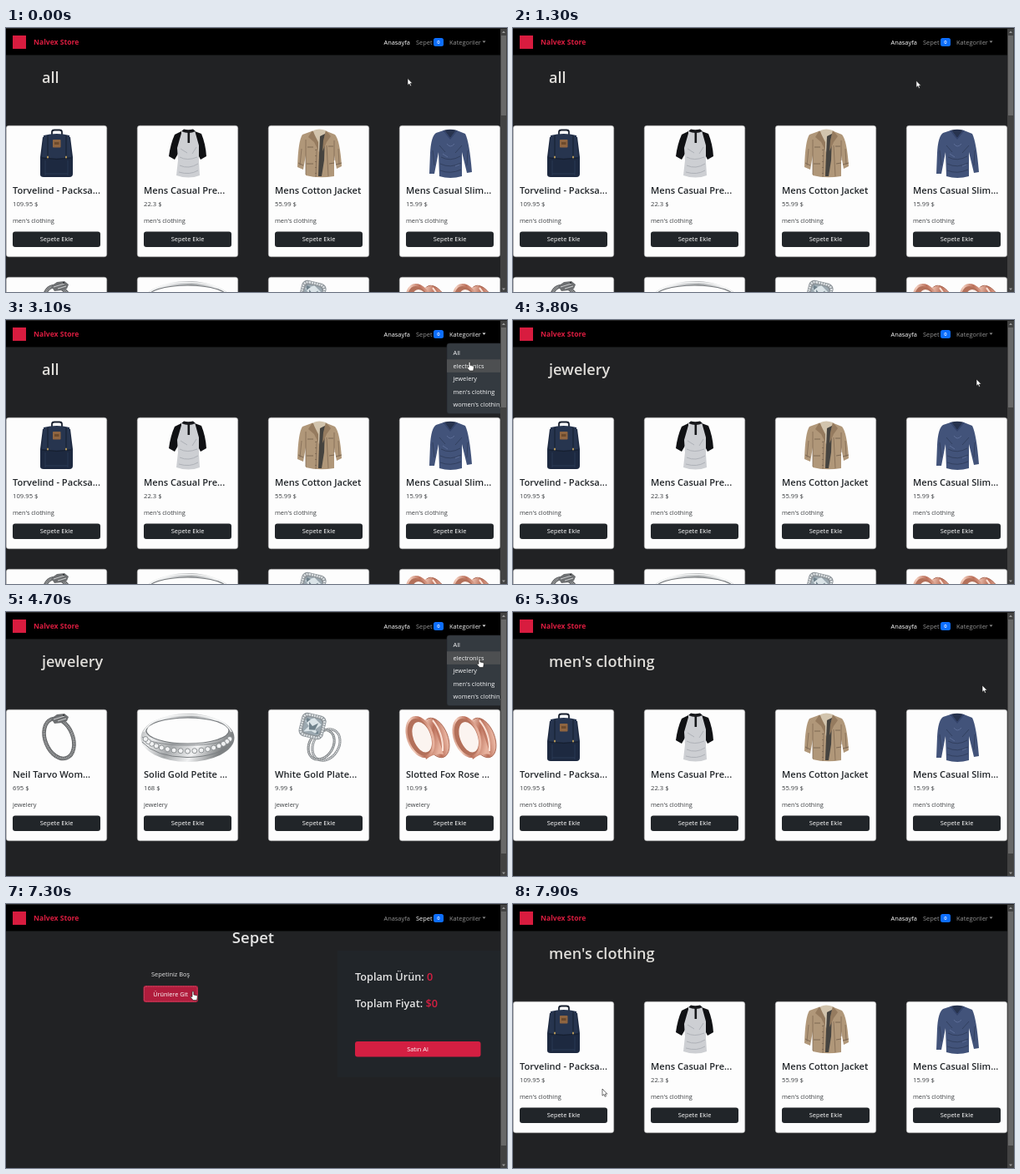
Animation of 600 by 317 pixels, one loop 8 s. Source, as an HTML page:

```html
<!DOCTYPE html>
<html lang="tr">
<head>
<meta charset="utf-8">
<title>Store</title>
<style>
html, body { margin: 0; width: 100%; height: 100%; overflow: hidden; background: #212224; }
svg { display: block; width: 100vw; height: 100vh; }
text { font-family: "Open Sans", "Noto Sans", sans-serif; }
.bold { font-weight: 600; }
.mid { text-anchor: middle; }
</style>
</head>
<body>
<svg id="stage" viewBox="0 0 600 317" xmlns="http://www.w3.org/2000/svg"></svg>
<script>
const RED = '#d41f42', MUTED = '#949494', LIGHT = '#e4e4e4';
const LOOP = 8000, STEP = 100;

const rect = (x, y, w, h, fill, r = 0, extra = '') =>
  `<rect x="${x}" y="${y}" width="${w}" height="${h}" rx="${r}" fill="${fill}" ${extra}/>`;
const text = (x, y, str, fill, size = 7.4, cls = '', extra = '') =>
  `<text x="${x}" y="${y}" fill="${fill}" class="${cls}" font-size="${size}" ${extra}>${str}</text>`;
const path = (d, fill, extra = '') => `<path d="${d}" fill="${fill}" ${extra}/>`;
const line = (d, color, width, extra = '') =>
  `<path d="${d}" fill="none" stroke="${color}" stroke-width="${width}" ${extra}/>`;
const ellipse = (cx, cy, rx, ry, fill, extra = '') =>
  `<ellipse cx="${cx}" cy="${cy}" rx="${rx}" ry="${ry}" fill="${fill}" ${extra}/>`;
const hoop = (cx, cy, rx, ry, color, width, extra = '') =>
  ellipse(cx, cy, rx, ry, 'none', `stroke="${color}" stroke-width="${width}" ${extra}`);
const place = (transform, body) => `<g transform="${transform}">${body}</g>`;
const group = (id, body, extra = '') => `<g id="${id}" ${extra}>${body}</g>`;
const gradient = (id, ...colors) => `<linearGradient id="${id}" x2="1" y2=".35">` +
  colors.map((c, i) => `<stop offset="${i / (colors.length - 1)}" stop-color="${c}"/>`).join('') +
  '</linearGradient>';

// Product pictures, drawn relative to a card's top left corner.
const backpack =
  line('M55 12V8Q55 5.5 58 5.5H64Q67 5.5 67 8V12', '#18202f', 1.8) +
  path('M44 14L41 38V59Q41 62 45 62H76Q80 62 80 58V38L77 14Z', '#1d2940') +
  path('M45 12Q61 8 76 12L78 38Q61 41 43 38Z', '#27354f') +
  line('M50 12V40M72 12V40M43 39Q61 42 78 39', '#151e2e', 1) +
  line('M47 42V60M74 42V60M47 58H74', '#30405d', .7) +
  rect(56, 17, 9.5, 9.5, '#8f6541', .8) + rect(58, 20, 5.5, 3, '#6c4a2c') +
  ellipse(50, 38, 1, 1.5, '#c0a05e') + ellipse(72, 38, 1, 1.5, '#c0a05e');

const raglan =
  path('M53 7L45 11Q40 22 38 37L45 41L53 27ZM69 7L77 10Q82 22 83 37L76 41L69 27Z', '#101114') +
  path('M54 6Q62 10 69 6L74 24L74 44L75 60Q62 65 47 60L49 42L48 27Z', '#cdcfd3') +
  path('M53 7Q62 11 70 7L67 4.5Q61 6 56 4.5Z', '#17181b') +
  rect(60.5, 8, 2.6, 13, '#17181b', .5) +
  line('M52 28L60 33M51 38Q60 43 72 38M51 48Q62 53 73 46M50 56Q63 60 73 54M71 26L66 34', '#aeb1b7', 1);

const jacket =
  path('M52 7L41 11Q36 18 35 50L42 53L45 36V60Q60 64 79 61L79 36L82 52L88 49Q86 18 80 11L70 7Z', '#b09779') +
  path('M54 6Q61 3 69 6L66 28L63 39L58 22Z', '#d2c4ad') +
  path('M62 13L68 10L67 42L64 61H60L61 35Z', '#45433f') +
  path('M53 6L48 14L55 20L60 30V20ZM69 6L75 13L70 20L65 31L66 18Z', '#957b5f') +
  line('M45 17V59M58 28L57 62M70 24L72 61M79 18V42M40 28L38 48M84 28L85 47', '#806a53', .8) +
  line('M46 46H54M73 46L79 45M47 26H54M72 25H78M36 45L42 48M81 47L88 45', '#7d6853', 1) +
  line('M57 29V58', '#5d4b3b', .9, 'stroke-dasharray="1 6"');

const sweater =
  path('M53 6L44 9Q38 13 37 33L36 58L42 58L47 32L48 61Q61 65 75 61L75 32L81 57L87 56Q84 20 79 10L69 6Z', '#42537a') +
  path('M54 5.5Q61 4 68 5.5L61 15Z', '#27334e') +
  line('M53 6L61 16L69 6', '#33436a', 1.3) +
  line('M48 24L55 32M75 24L67 33M50 38Q61 44 73 37M49 46Q61 52 74 45M49 54Q61 59 74 53M40 30L42 48M82 30L81 48', '#32405f', 1) +
  line('M57 22Q61 28 66 22M52 34L58 38M67 49L72 47', '#5d6e98', 1);

const bracelet =
  place('translate(63.5 35) rotate(-22)',
    hoop(0, 0, 16.5, 25, '#606264', 4.6) +
    hoop(0, 0, 16.5, 25, '#a9abac', 2.8, 'stroke-dasharray="1 .9"')) +
  path('M54 11L61 6L70 5L75 9L73 14L67 16L58 17Z', '#6d6f71') +
  line('M57 12L70 8M62 14L72 11', '#cfd0d1', 1) + ellipse(69, 7, 1, 1, '#2c2e30');

const gems = Array.from({ length: 17 }, (_, i) => {
  const a = (18 + i * 9) * Math.PI / 180;
  return ellipse((60.5 + 53 * Math.cos(a)).toFixed(1), (29 + 21 * Math.sin(a)).toFixed(1),
    3, 3, '#f0f1f2', 'stroke="#84888b" stroke-width=".9"');
}).join('');
const band =
  ellipse(60.5, 34, 56, 29, 'url(#silver)') +
  line('M6 39Q22 57 60 57.5Q99 57 115 39', '#7b7f82', 1) +
  line('M6 33Q18 42.5 60 43Q103 42.5 115 33', '#85898c', 1) + gems +
  ellipse(60.5, 25.5, 49.5, 15.5, '#fdfdfd', 'stroke="#75797c" stroke-width="1.2"') +
  line('M8 27Q18 7 60 6.5Q103 7 113 27', '#f4f5f5', 1.4);

const solitaire =
  place('translate(65 42) rotate(32)',
    hoop(4, -2, 15, 20, '#8b8f92', 3) + hoop(4, -2, 15, 20, '#e4e6e8', 1.3, 'stroke-dasharray="1.4 .7"') +
    hoop(-1, 1, 14, 19, '#7c8083', 3) + hoop(-1, 1, 14, 19, '#d3d6d8', 1.3, 'stroke-dasharray="1.4 .7"')) +
  place('translate(53 20) rotate(14)',
    rect(-15, -14.5, 30, 29, '#8a9196', 7) +
    rect(-13, -12.5, 26, 25, 'none', 6, 'stroke="#dde1e3" stroke-width="2.6" stroke-dasharray="2 .9"') +
    rect(-10.5, -10, 21, 20, '#9ba8b0', 5) +
    path('M-10 -4L0 -10L10 -4L4 3L10 9L0 6L-9 9L-4 1Z', '#dbe4e8') +
    path('M-5 -4L0 0L6 -5L4 4L-3 5ZM-9 -8L-4 -7L-8 -2ZM8 4L9 8L5 8Z', '#6f818b'));

const tunnel = x => place(`translate(${x} 0)`,
  place('rotate(-22 41 34)', ellipse(41, 34, 14, 25, 'url(#copper)') + hoop(41, 34, 14, 25, '#a45f49', .8)) +
  path('M14 10Q27 16 36 10L50 54Q38 52 29 60Z', 'url(#copper)') +
  place('rotate(-20 22 33)',
    ellipse(22, 33, 16, 26, 'url(#copper)') +
    ellipse(21.5, 33, 13.5, 23, '#b3705a') +
    ellipse(24, 34, 10.5, 19, '#fbf4f0')) +
  line('M37 13Q50 29 49 50', '#f9e0d5', 2));
const tunnels = tunnel(3) + tunnel(59);

const clothes = [
  ['Torvelind - Packsa...', '109.95 $', backpack],
  ['Mens Casual Pre...', '22.3 $', raglan],
  ['Mens Cotton Jacket', '55.99 $', jacket],
  ['Mens Casual Slim...', '15.99 $', sweater],
];
const jewels = [
  ['Neil Tarvo Wom...', '695 $', bracelet],
  ['Solid Gold Petite ...', '168 $', band],
  ['White Gold Plate...', '9.99 $', solitaire],
  ['Slotted Fox Rose ...', '10.99 $', tunnels],
];
const card = category => ([name, price, picture], i) => place(`translate(${i * 157} 117)`,
  rect(.25, .25, 120.5, 157.5, '#fdfdfd', 3, 'stroke="#a0a0a0" stroke-width=".5"') + picture +
  text(8, 82.3, name, '#212529', 11.1, 'bold') +
  text(8, 97, price, '#3c3f42', 7.7) +
  text(8, 116.5, category, '#3c3f42') +
  rect(8, 127.5, 105, 18.5, '#212529', 3) +
  text(60.5, 139.4, 'Sepete Ekle', '#fff', 7.4, 'mid'));

const MENU = ['All', 'electronics', 'jewelery', "men's clothing", "women's clothing"];
const MENU_TOP = 31.7, ROW = 15.6;

const listPage = group('list',
  text(43, 66.2, '', '#dfddd9', 18.1, 'bold', 'id="heading"') +
  group('clothes', clothes.map(card("men's clothing")).join('')) +
  group('jewels', jewels.map(card('jewelery')).join('')));

const total = (y, label, value) =>
  text(418, y, `${label}: <tspan fill="${RED}">${value}</tspan>`, LIGHT, 12.7, 'bold');
const cartPage = group('cart',
  text(296, 47, 'Sepet', LIGHT, 18.5, 'bold mid') +
  text(197, 87, 'Sepetiniz Boş', LIGHT, 7.4, 'mid') +
  rect(164.5, 98, 65.5, 20, RED, 3, 'id="goButton"') +
  rect(165.5, 99, 63.5, 18, 'none', 2.4, 'id="goRing" stroke="#e58a9b" stroke-width=".6" stroke-dasharray="1 1"') +
  text(197, 110.5, 'Ürünlere Git', '#fff', 7.3, 'mid') +
  rect(397, 56, 195, 152, '#212529') +
  total(92, 'Toplam Ürün', '0') + total(124, 'Toplam Fiyat', '$0') +
  rect(418, 165, 150.5, 18.5, RED, 3) +
  text(493, 177, 'Satın Al', '#fff', 7.4, 'mid'));

const navbar =
  rect(0, 0, 600, 32.5, '#000') + rect(0, 0, 600, 1, '#242424') +
  rect(8, 9, 16, 16, '#d81c3f') +
  text(33, 20, 'Nalvex Store', '#d81c3f', 8.6, '', 'font-weight="700"') +
  text(452.5, 19.5, 'Anasayfa', '#fff', 7.4, '', 'id="navHome"') +
  text(491, 19.5, 'Sepet', MUTED, 7.4, '', 'id="navCart"') +
  rect(512, 12, 12, 10, '#0d6efd', 2.5) + text(518, 19, '0', '#fff', 5.8, 'bold mid') +
  group('navMenu', text(531, 19.5, 'Kategoriler', 'inherit') + path('M570.5 15.5h4l-2 2.2z', 'inherit'));

const menu = group('menu',
  rect(528, 28, 70, 84.5, '#343a40', 3, 'stroke="#24282c" stroke-width=".6"') +
  rect(528, 0, 70, ROW, '#4d4f51', 0, 'id="menuHover"') +
  MENU.map((label, i) => text(535.5, 42.4 + i * (ROW - .1), label, '#f4f5f6')).join(''));

const scrollbar =
  rect(592, 1, 8, 316, '#424242') + rect(593, 9, 6, 96, '#686868', 0, 'id="thumb"') +
  path('M594 6h4l-2-2.4zM594 312.5h4l-2 2.4z', '#9a9a9a');

const cursor = group('cursor',
  path('M0 0V8.2L1.9 6.5L3.1 9.3L4.5 8.7L3.3 6.1H5.8Z', '#fff', 'id="arrow"') +
  path('M-1 .8A.95.95 0 0 1 .9 .8V4L4.4 4.8Q5.5 5.1 5.3 6.6L4.6 10.6H.2L-3 6.9Q-3 5.4 -1 6.5Z', '#fff', 'id="hand"'),
  'stroke="#111" stroke-width=".6" stroke-linejoin="round"');

document.getElementById('stage').innerHTML =
  '<defs>' + gradient('silver', '#8b8e90', '#eff0f1', '#a5a8aa', '#f1f2f3', '#7f8284') +
  gradient('copper', '#c47c64', '#f3cdbd', '#bb705a', '#e7b29e') + '</defs>' +
  rect(0, 0, 600, 317, '#212224') + listPage + cartPage + navbar + menu + scrollbar + cursor;

const el = {};
document.querySelectorAll('[id]').forEach(node => { el[node.id] = node; });
const show = (node, on) => node.setAttribute('display', on ? 'inline' : 'none');
const within = (t, ...ranges) => ranges.some(([a, b]) => t >= a && t < b);

// Pointer tip: time, x, y
const TRACK = [
  [0, 481, 60.5], [600, 481, 62], [1800, 484, 64], [2300, 505, 22], [2500, 540, 23],
  [2800, 550, 20], [3200, 556, 56], [3400, 555, 70], [3800, 555, 71], [4100, 556, 60],
  [4400, 561, 20], [4550, 563, 34], [4700, 567, 56], [4900, 563, 86], [5300, 562, 88],
  [5900, 525, 30], [6100, 511, 16], [6300, 511, 16], [6700, 400, 135], [6950, 270, 140],
  [7200, 224, 105], [7400, 224, 105], [7800, 107, 222], [LOOP, 107, 222],
];
const pointerAt = t => {
  const i = TRACK.findIndex(key => key[0] > t);
  const [t0, x0, y0] = TRACK[i - 1], [t1, x1, y1] = TRACK[i];
  const k = (t - t0) / (t1 - t0), s = k * k * (3 - 2 * k);
  return [x0 + (x1 - x0) * s, y0 + (y1 - y0) * s];
};

function draw(t) {
  const inCart = within(t, [6300, 7400]);
  const isAll = t < 4000, isJewelry = within(t, [4000, 5300]);
  const menuOpen = within(t, [2800, 3500], [4450, 5000]);
  const overMenu = within(t, [2600, 2800], [4300, 4450]);
  const overCart = within(t, [2300, 2600], [6000, 6300]);
  const overGo = within(t, [7100, 7400]);
  const [x, y] = pointerAt(t);

  show(el.list, !inCart);
  show(el.cart, inCart);
  el.heading.textContent = t < 3500 ? 'all' : t < 5000 ? 'jewelery' : "men's clothing";
  show(el.clothes, !isJewelry);
  show(el.jewels, isAll || isJewelry);
  el.jewels.setAttribute('transform', `translate(0 ${isAll ? 182 : 0})`);
  el.thumb.setAttribute('height', isAll ? 96 : 281);

  el.navHome.setAttribute('fill', inCart ? MUTED : '#fff');
  el.navCart.setAttribute('fill', inCart ? '#fff' : overCart ? '#bfbfbf' : MUTED);
  el.navMenu.setAttribute('fill', menuOpen ? '#f0f0f0' : overMenu ? '#c8c8c8' : MUTED);

  show(el.menu, menuOpen);
  const row = Math.floor((y - MENU_TOP) / ROW);
  show(el.menuHover, menuOpen && row >= 0 && row < MENU.length);
  el.menuHover.setAttribute('y', MENU_TOP + row * ROW);

  el.goButton.setAttribute('fill', overGo ? '#b01c3c' : RED);
  show(el.goRing, within(t, [7300, 7400]));

  const isHand = menuOpen || overMenu || overCart || overGo;
  show(el.hand, isHand);
  show(el.arrow, !isHand);
  el.cursor.setAttribute('transform', `translate(${x.toFixed(1)} ${y.toFixed(1)})`);
}

const start = performance.now();
function tick() {
  const t = (performance.now() - start) % LOOP;
  draw(Math.floor(t / STEP) * STEP);
  requestAnimationFrame(tick);
}
tick();
</script>
</body>
</html>
```
